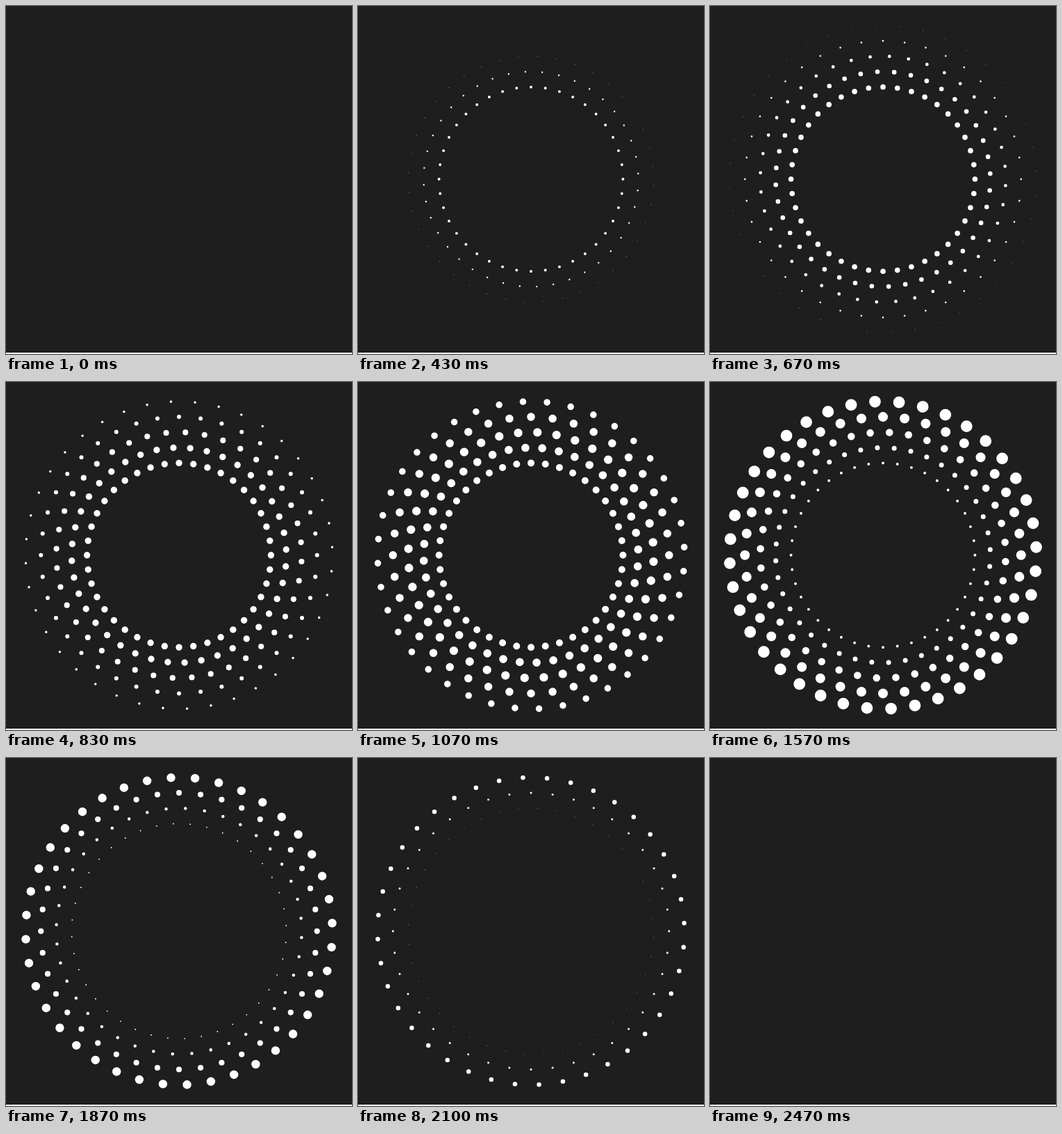
Recreate the animation shown at these times as an HTML page with a canvas. Size 498 px wide and 500 px high, loop 2530 ms.

```html
<!DOCTYPE html>
<html lang="en">
<head>
<meta charset="utf-8">
<title>Pulsing dot rings</title>
<style>
  html, body { margin: 0; width: 100%; height: 100%; overflow: hidden; background: #1e1e1e; }
  canvas { display: block; }
</style>
</head>
<body>
<canvas id="stage" width="498" height="500"></canvas>
<script>
  const ctx = document.getElementById('stage').getContext('2d');
  const LOOP = 2530, PULSE = 2000, STAGGER = 132;
  const RINGS = 5, DOTS = 40;
  const CX = 249, CY = 248.8;
  const STEP = 2 * Math.PI / DOTS;

  function drawRing(i, t) {
    const age = t - i * STAGGER;
    if (age <= 0 || age >= PULSE) return;
    const radius = 132.4 + 22.1 * i;
    const size = radius * 0.0382 * Math.sin(Math.PI * age / PULSE) ** 2;
    ctx.beginPath();
    for (let k = 0; k < DOTS; k++) {
      const a = (k - i / 3) * STEP;
      const x = CX + radius * Math.sin(a);
      const y = CY - radius * Math.cos(a);
      ctx.moveTo(x + size, y);
      ctx.arc(x, y, size, 0, 2 * Math.PI);
    }
    ctx.fill();
  }

  function fillRows(color, y, height) {
    ctx.fillStyle = color;
    ctx.fillRect(0, y, 498, height);
  }

  function draw(t) {
    fillRows('#1e1e1e', 0, 497);
    fillRows('#1a1216', 497, 1);
    fillRows('#fff', 498, 2);
    for (let i = 0; i < RINGS; i++) drawRing(i, t);
  }

  const start = performance.now();
  function tick() {
    draw((performance.now() - start) % LOOP);
    requestAnimationFrame(tick);
  }
  tick();
</script>
</body>
</html>
```
